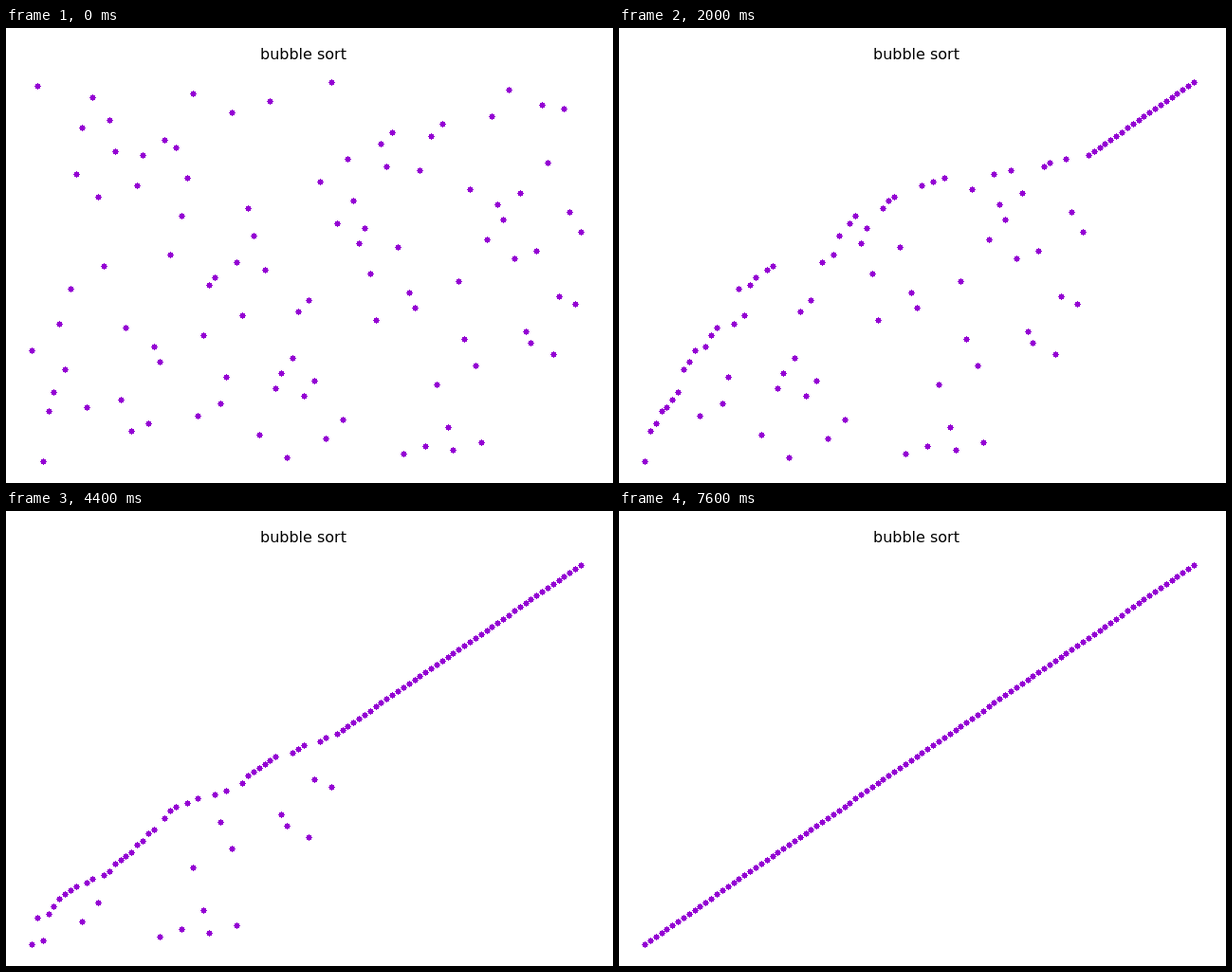
An HTML page with a canvas for the animation above (7700 ms loop, 640 px wide and 480 px high).

```html
<!DOCTYPE html>
<html lang="en">
<head>
<meta charset="utf-8">
<title>bubble sort</title>
<style>
  html, body { margin: 0; width: 100%; height: 100%; overflow: hidden; background: #fff; }
  canvas, svg { position: absolute; left: 0; top: 0; width: 640px; height: 480px; display: block; }
  text { font: 16px "DejaVu Sans", sans-serif; fill: #000; }
</style>
</head>
<body>
<canvas id="plot" width="640" height="480"></canvas>
<svg viewBox="0 0 640 480"><text x="268" y="33">bubble sort</text></svg>
<script>
const ctx = document.getElementById('plot').getContext('2d');
const STEP = 100, PASSES = 77;
const LEFT = 27, WIDTH = 579;

// Starting heights of the shuffled values, in pixels from the top
const start = [
  340, 61, 457, 404, 384, 312, 360, 275, 154, 105,
  400, 73, 178, 251, 97, 130, 392, 316, 425, 166,
  134, 417, 336, 352, 118, 239, 126, 198, 158, 69,
  409, 324, 271, 263, 396, 368, 89, 247, 303, 190,
  219, 429, 255, 77, 380, 364, 453, 348, 299, 388,
  287, 372, 162, 433, 57, 206, 413, 138, 182, 227,
  211, 259, 308, 122, 146, 110, 231, 449, 279, 295,
  150, 441, 114, 376, 101, 421, 445, 267, 328, 170,
  356, 437, 223, 93, 186, 202, 65, 243, 174, 320,
  332, 235, 81, 142, 344, 283, 85, 194, 291, 215
];

// One sweep: lower points (larger y) move towards the left
function sweep(list) {
  const a = list.slice();
  for (let i = 0; i + 1 < a.length; i++) {
    if (a[i] < a[i + 1]) [a[i], a[i + 1]] = [a[i + 1], a[i]];
  }
  return a;
}

const states = [start];
while (states.length < PASSES) states.push(sweep(states[states.length - 1]));

function dot(x, y) {
  ctx.fillRect(x - 2, y - 2, 5, 5);
  ctx.fillRect(x - 3, y, 7, 1);
  ctx.fillRect(x, y - 3, 1, 7);
}

function draw(list) {
  ctx.fillStyle = '#fff';
  ctx.fillRect(0, 0, 640, 480);
  ctx.fillStyle = '#9400d3';
  list.forEach((y, i) => dot(LEFT + Math.round(i * WIDTH / (list.length - 1)), y));
}

let origin = null;
function tick(now) {
  if (origin === null) origin = now;
  draw(states[Math.floor((now - origin) / STEP) % PASSES]);
  requestAnimationFrame(tick);
}

draw(start);
requestAnimationFrame(tick);
</script>
</body>
</html>
```
